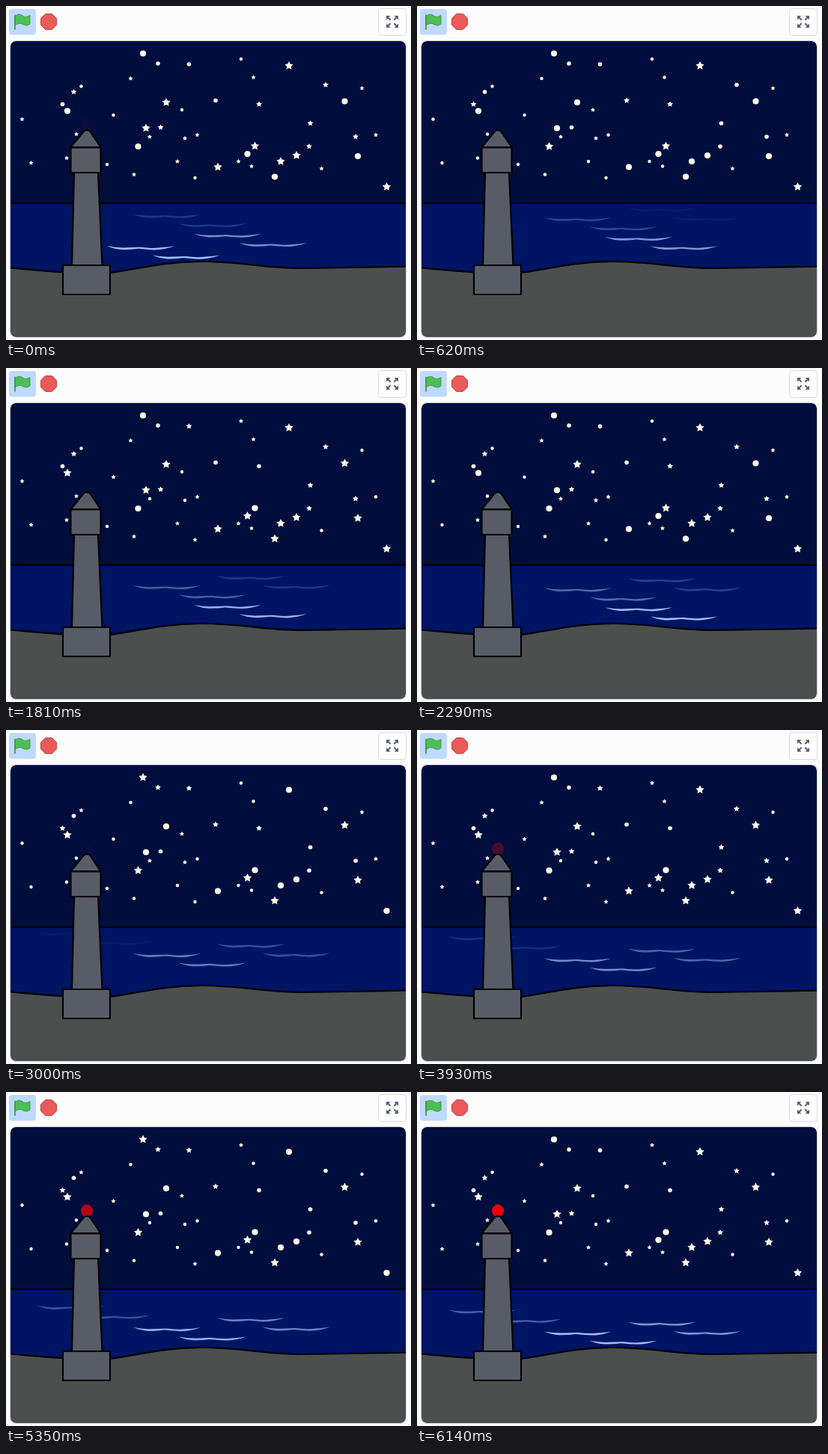
Recreate the animation shown at these times as an HTML page. Size 541 by 447 pixels, loop 6210 ms.

```html
<!DOCTYPE html>
<html lang="en">
<head>
<meta charset="utf-8">
<title>Lighthouse at night</title>
<style>
  html, body { margin: 0; width: 100%; height: 100%; overflow: hidden; background: #fcfcfc; }
  svg { display: block; width: 541px; height: 447px; }
  .ink { stroke: #000; stroke-width: 2.2; stroke-linejoin: round; }
  .stone { fill: #585c66; }
</style>
</head>
<body>
<svg viewBox="0 0 541 447">
  <defs>
    <clipPath id="stage"><rect x="6" y="47" width="528" height="396" rx="7"/></clipPath>
    <path id="ripple" d="M-45-2.5Q-32 .2-18-.5T0-1Q14 1 26-.5Q36-.8 45-2.5Q32 2.6 18 2.6Q8 2.4-3 1Q-14 2.5-25 2.3Q-36 1.6-45-2.5Z"/>
    <path id="arrow" d="M8-8H2.6L4.6-6L1.6-3.1L3.1-1.6L6-4.6L8-2.6Z"/>
  </defs>

  <rect x="4" y="4" width="36" height="34.5" rx="4" fill="#bfd9ff"/>
  <path d="M12 14C16 10 20 11 23 13.5C26 15.3 29 14 32 12.5V24C28 27 25 26 22 24.3C19 22.8 16 23 12 26Z" fill="#4cbf56" stroke="#45993d"/>
  <path d="M12 12.5V31" stroke="#45993d" stroke-width="1.8" stroke-linecap="round"/>
  <path d="M52.6 10.5H61.4L67.5 16.6V25.4L61.4 31.5H52.6L46.5 25.4V16.6Z" fill="#ec5959" stroke="#b84848" stroke-linejoin="round"/>
  <rect x="497.5" y="3.5" width="37" height="36" rx="4" fill="#fff" stroke="#d9dce2"/>
  <g transform="translate(516 21)" fill="#575e75">
    <use href="#arrow"/><use href="#arrow" transform="rotate(90)"/>
    <use href="#arrow" transform="rotate(180)"/><use href="#arrow" transform="rotate(270)"/>
  </g>

  <g clip-path="url(#stage)">
    <rect x="5" y="46" width="530" height="220" fill="#000e3e"/>
    <g id="stars" fill="#fffde8"/>
    <rect x="0" y="264" width="541" height="110" fill="#001464" class="ink"/>
    <g id="waves" fill="#a5c0ff"/>
    <path class="ink" fill="#4d4f4e" d="M0 350C35 353 55 355 80 356.5C100 358 120 359 139 357C185 350 215 342 262 342C310 342 350 351 395 351C440 350.5 490 349 541 348.5V460H0Z"/>
    <ellipse id="lamp" cx="108" cy="159" rx="8" ry="8.5" fill="#f50008"/>
    <g class="ink stone">
      <path d="M91 222H123L128.5 347H88Z"/>
      <rect x="76" y="347" width="63" height="39"/>
      <path d="M86.5 189L104 167.5Q108 165 112 167.5L126.5 189Z"/>
      <rect x="86.5" y="189.5" width="40" height="33.5"/>
    </g>
  </g>
  <rect x="5.5" y="46.5" width="529" height="397" rx="7.5" fill="none" stroke="#cfd3da"/>
</svg>

<script>
const LOOP = 6210;
const TWINKLE = 1070;      // time between shape switches of one star
const WAVE_SPEED = 0.0068; // px per ms
const WAVE_END = 325.4;

// [radius, starts as a star, [x, y, first switch in ms], ...]
const starGroups = [
  [4.1, true,
    [378, 80, 660], [214, 129, 500], [187, 163.5, 80], [332.5, 187.5, 820], [388, 200, 200],
    [367, 208, 560], [283, 215.5, 90], [508.5, 242, 650]],
  [4.1, false,
    [183, 63.5, 650], [452.5, 127.5, 810], [82, 140.5, 830], [176.5, 188, 540],
    [322.5, 198, 755], [470, 201, 820], [359, 228.5, 825]],
  [2.8, true,
    [427, 105.5, 480], [405, 188, 600], [467, 175, 400], [90.5, 115, 210],
    [406.5, 157, 580], [338, 131.5, 900], [206.5, 162.5, 520]],
  [2.8, false,
    [203, 77, 625], [244.5, 78, 750], [75.5, 131.5, 610], [280, 126.5, 460]],
  [2.2, true,
    [330.5, 95.5, 190], [166.5, 97, 430], [475.5, 110, 980], [21.5, 151.5, 420],
    [192, 175, 920], [94, 171.5, 100], [239, 177, 950], [255.5, 172.5, 570],
    [494, 172.5, 880], [81, 203.5, 360], [33.5, 210, 80], [229, 208, 620],
    [310.5, 208, 450], [328, 214.5, 550], [421.5, 217.5, 840], [171, 225.5, 390]],
  [2.2, false,
    [314, 71, 960], [100.5, 107.5, 600], [143.5, 146, 1000], [235, 139, 440],
    [135, 212, 530], [252.5, 230, 930], [122.5, 223.5, 970]],
];

// x and height of the first ripple in each pair at the loop start
const swells = [[180, 323.8], [296, 307.2], [215, 281.2], [327, 268.4], [87, 252.2]];

const byId = id => document.getElementById(id);
const clamp = v => Math.max(0, Math.min(1, v));

function add(parent, tag, attrs) {
  const node = document.createElementNS("http://www.w3.org/2000/svg", tag);
  for (const key in attrs) node.setAttribute(key, attrs[key]);
  return parent.appendChild(node);
}

function starPath(r) {
  const points = Array.from({ length: 10 }, (_, i) => {
    const angle = i * Math.PI / 5 - Math.PI / 2;
    const reach = r * (i % 2 ? 0.74 : 1.45);
    return `${(reach * Math.cos(angle)).toFixed(2)},${(reach * Math.sin(angle)).toFixed(2)}`;
  });
  return `M${points.join("L")}Z`;
}

const dotPath = r => `M${-r} 0A${r} ${r} 0 0 1 ${r} 0A${r} ${r} 0 0 1 ${-r} 0Z`;

const stars = starGroups.flatMap(([r, pointed, ...list]) =>
  list.map(([x, y, first]) => ({
    first, pointed,
    shapes: [dotPath(r), starPath(r)],
    node: add(byId("stars"), "path", { transform: `translate(${x} ${y})` }),
  })));

const waves = swells.map(([x, y]) => {
  const node = add(byId("waves"), "g");
  add(node, "use", { href: "#ripple" });
  add(node, "use", { href: "#ripple", x: 60.5, y: 12.3 });
  return { x, y, node };
});

function draw(t) {
  for (const s of stars) {
    const switches = t < s.first ? 0 : 1 + Math.floor((t - s.first) / TWINKLE);
    s.node.setAttribute("d", s.shapes[(switches + s.pointed) % 2]);
  }
  for (const w of waves) {
    const y = w.y + t * WAVE_SPEED;
    w.node.setAttribute("transform", `translate(${w.x} ${y.toFixed(2)})`);
    w.node.setAttribute("opacity", y > WAVE_END ? 0 : clamp((y - 270) / 54));
  }
  const glow = t < 2000 ? 0.04 - t * 0.0003 : (t - 2930) * 0.0003;
  byId("lamp").setAttribute("opacity", clamp(glow));
}

const start = performance.now();
function tick() {
  draw((performance.now() - start) % LOOP);
  requestAnimationFrame(tick);
}
tick();
</script>
</body>
</html>
```
